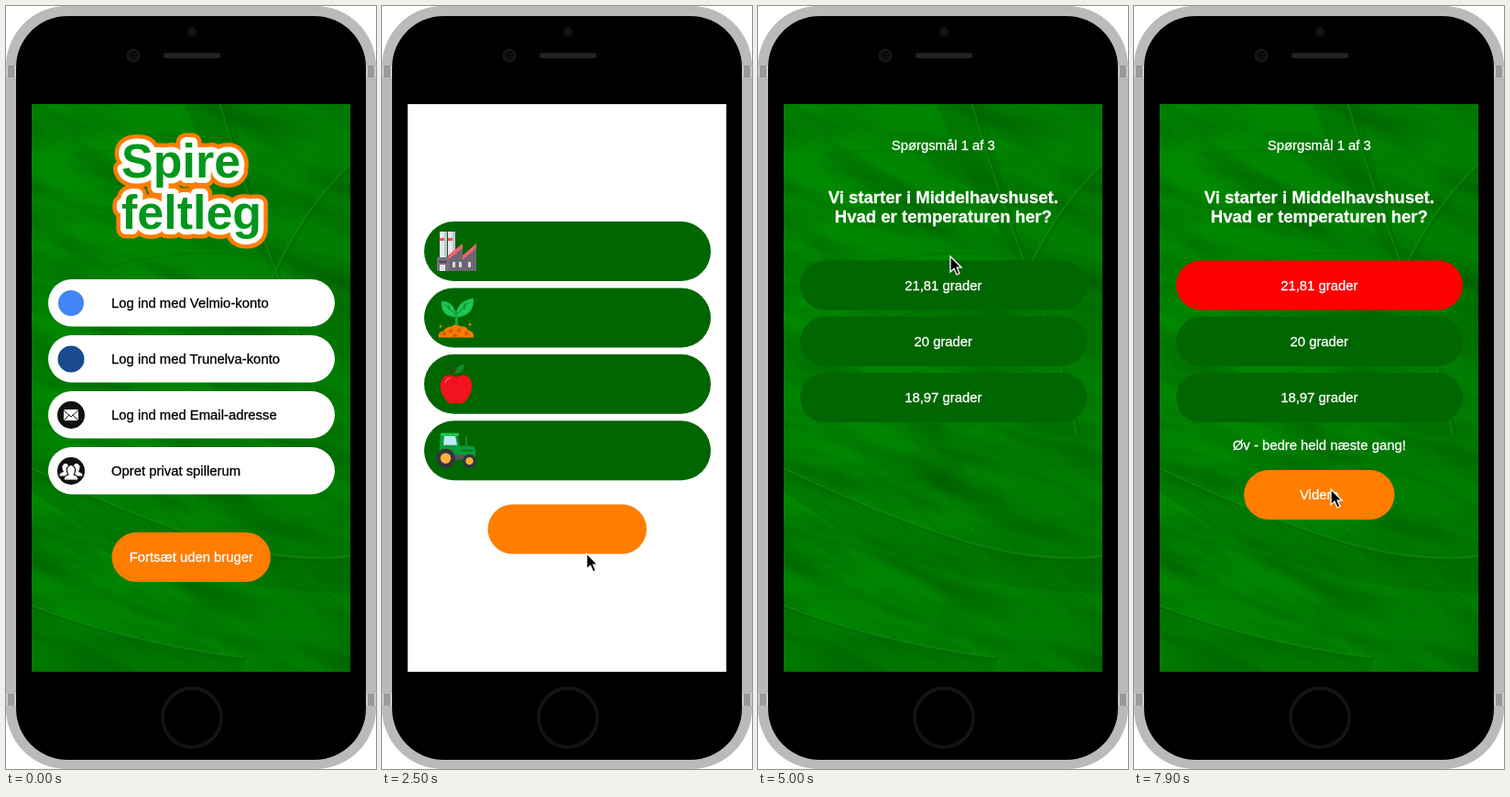
An HTML page for the animation above (8000 ms loop, 404 px wide and 832 px high).

```html
<!DOCTYPE html>
<html lang="da">
<head>
<meta charset="utf-8">
<style>
html, body { margin: 0; width: 100%; height: 100%; overflow: hidden; background: #fff; }
svg { display: block; width: 404px; height: 832px; }
text { font: 14.85px "Liberation Sans", Arial, sans-serif; fill: #fff; stroke: #fff; stroke-width: .3px; }
.dark { fill: #000; stroke: #000; }
.mid { text-anchor: middle; }
.title { font-size: 22.28px; font-weight: bold; }
.question { font-size: 18.56px; font-weight: bold; }
.brand { font-size: 52px; font-weight: bold; stroke-linejoin: round; }
</style>
</head>
<body>
<svg id="stage" viewBox="0 0 404 832"></svg>
<script>
const GREEN = '#006600', ORANGE = '#ff7d00';

const rect = (x, y, w, h, fill, r = 0) => `<rect x="${x}" y="${y}" width="${w}" height="${h}" rx="${r}" fill="${fill}"/>`;
const pill = (x, y, w, h, fill) => rect(x, y, w, h, fill, h / 2);
const circle = (x, y, r, fill) => `<circle cx="${x}" cy="${y}" r="${r}" fill="${fill}"/>`;
const path = (d, fill, stroke = 'none', width = 1) =>
  `<path d="${d}" fill="${fill}" stroke="${stroke}" stroke-width="${width}" stroke-linecap="round"/>`;
const line = (d, stroke, width) => path(d, 'none', stroke, width);
const text = (x, y, s, cls = 'mid', attrs = '') => `<text x="${x}" y="${y}" class="${cls}" ${attrs}>${s}</text>`;
const group = (id, body, attrs = '') => `<g id="${id}" ${attrs}>${body}</g>`;
const at = (x, y, body) => `<g transform="translate(${x} ${y})">${body}</g>`;
const faded = (opacity, body) => `<g opacity="${opacity}">${body}</g>`;

function phone() {
  let s = rect(0, 0, 404, 832, '#bababa', 66) + rect(11, 11, 382, 811, '#000', 56);
  for (const y of [65, 750]) for (const x of [0, 393])
    s += rect(x, y, 11, 13, '#cbcbcb') + rect(x + 2, y, 7, 13, '#999');
  return s + circle(203, 28, 5, '#131313') + circle(139, 54, 7.5, '#181818') + circle(139, 54, 5, '#0c0c0c') +
    rect(172, 51, 62, 6, '#222', 3) +
    '<circle cx="203" cy="776" r="32" fill="none" stroke="#131313" stroke-width="4"/>';
}

function leaf() {
  const mainVeins = 'M235 107Q262 200 300 300T350 470M377 175Q325 225 292 300M28 505Q120 550 210 580T377 602M28 655Q130 695 260 712';
  let veins = '';
  for (let i = 0; i < 6; i++) veins += `M${225 + i * 22} ${170 + i * 52}q-60 ${-20 + i * 4} -150 ${-8 + i * 8}`;
  for (let i = 0; i < 7; i++) veins += `M${45 + i * 45} ${512 + i * 13}q28 45 90 70`;
  return rect(28, 107, 348, 619, 'url(#leafShade)') +
    faded(.3, path('M195 107H246Q268 200 300 300Q230 200 195 107ZM28 505Q120 550 210 580T377 602V640Q180 640 28 530ZM28 655Q130 695 260 712V726H28Z', '#005c00')) +
    '<g transform="rotate(20 202 416)"><rect x="-160" y="20" width="730" height="800" filter="url(#mottle)"/></g>' +
    faded(.35, line(veins, '#006400', 2)) +
    faded(.5, line(mainVeins, '#006600', 4)) + faded(.5, at(-2, -2, line(mainVeins, '#149414', 2)));
}

function brand() {
  const words = style => text(126, 187, 'Spire', 'brand', `style="${style}"`) + text(126, 243, 'feltleg', 'brand', `style="${style}"`);
  const outline = (color, width) => words(`fill:${color};stroke:${color};stroke-width:${width}px`);
  return outline(ORANGE, 21) + outline('#fff', 12) + words('fill:#00961c;stroke:none');
}

const envelope = circle(0, 0, 15, '#111') + rect(-8, -6, 16, 12, '#fff', 1) +
  line('M-8 -5L0 2L8 -5M-8 6L-2 0M8 6L2 0', '#111', 1);
const person = (x, y, k) => `<g transform="translate(${x} ${y}) scale(${k})">` +
  path('M-8 9Q-8 4 -3 3Q-5 0 -4.5 -4Q0 -11 4.5 -4Q5 0 3 3Q8 4 8 9Z', '#fff', '#111', 1.2) + '</g>';
const people = circle(0, 0, 15, '#111') + person(-6, -2, .9) + person(6, -2, .9) + person(0, 1, 1);

// Icons occupy a 42 by 44 box
const factory = rect(3, 0, 8, 32, '#e6e6ec') + rect(12, 0, 8, 32, '#e6e6ec') +
  rect(3, 7, 8, 3, '#f05060') + rect(12, 7, 8, 3, '#f05060') + rect(8, 0, 3, 30, '#c4c4ce') + rect(17, 0, 3, 30, '#c4c4ce') +
  path('M12 43V30L28 15V30L43 15V43Z', '#6d6673') + path('M12 31V26L28 13V18ZM28 31V26L43 13V18Z', '#f0606c') +
  rect(0, 28, 13, 15, '#77707d') + rect(2, 32, 9, 2, '#4c4652') + rect(3, 36, 6, 7, '#e0e0e8') +
  [17, 24, 34].map(x => rect(x, 33, 3, 6, '#d9d9e2')).join('');

const sprout = line('M21 31Q22 22 21 15', '#18a43c', 3) +
  path('M21 21Q3 20 5 3Q20 4 21 21Z', '#1cc853', '#0b8a30', .6) + path('M21 21Q20 3 40 0Q41 20 21 21Z', '#1cc853', '#0b8a30', .6) +
  line('M9 7L19 17M34 5L23 17M13 8V12M30 6V12', '#087a28', 1) +
  path('M2 43Q0 37 7 36Q10 31 16 31Q20 27 26 31Q31 30 34 35Q41 36 40 43Z', '#f57c00') +
  [[8, 39], [15, 36], [24, 35], [32, 39], [20, 41]].map(([x, y]) => circle(x, y, 2.2, '#d45c00')).join('') +
  circle(4, 31, 1.3, '#f57c00') + circle(36, 29, 1.3, '#f57c00');

const apple = path('M21 14Q10 8 5 17Q1 27 9 38Q14 45 21 42Q28 45 33 38Q41 27 37 17Q32 8 21 14Z', '#f3121f') +
  line('M21 14Q20 6 16 3', '#6b3a16', 2) + path('M20 10Q21 0 30 0Q30 9 20 10Z', '#118c30') +
  line('M9 20Q10 16 14 15', '#ff6068', 1.5);

const wheel = (x, y, r) => circle(x, y, r, '#34343c') + circle(x, y, r * .55, '#ffb03a');
const tractor = at(0, 2.5, path('M4 0H22L25 14H39Q43 16 42 26H2Z', '#0c9c34') + path('M8 3H20L22 13H7Z', '#bdeafa') +
  rect(4, 0, 20, 3, '#19c650') + rect(31, 4, 2, 12, '#178c3c') + rect(27, 18, 12, 2, '#087526') +
  rect(18, 24, 20, 5, '#55555f') + wheel(9.5, 27.5, 10.5) + wheel(35.5, 30.5, 7.5));

function loginPage() {
  const rows = ['Log ind med Velmio-konto', 'Log ind med Trunelva-konto', 'Log ind med Email-adresse', 'Opret privat spillerum'];
  const icons = [circle(0, 0, 14, '#4285f4'), circle(0, 0, 14.5, '#194b8e'), envelope, people];
  return brand() + rows.map((s, i) => {
    const y = 298 + i * 61;
    return pill(46, y, 313, 51.5, '#fff') + at(71, y + 26, icons[i]) + text(115, y + 31, s, 'dark');
  }).join('') + pill(115.5, 574, 173.5, 54, ORANGE) + text(202.3, 606, 'Fortsæt uden bruger');
}

function scenarioPage() {
  const buttons = [factory, sprout, apple, tractor].map((icon, i) =>
    pill(46, 235 + i * 72.4, 313, 65, GREEN) + at(60, 246 + i * 72.4, icon)).join('') + pill(115.5, 543.5, 173.5, 54, ORANGE);
  const labels = [[272, 'Forurening vs. natur'], [336, 'Beskyttelse af'], [353, 'områder og befolkning'],
    [417, 'Mad til hele verden'], [489, 'Landbrug vs. natur']];
  return buttons + group('labels', text(202.3, 183, 'Vælg scenarie', 'mid title') +
    labels.map(([y, s]) => text(224, y, s)).join('') + text(202.3, 575, 'Vælg for mig'));
}

function questionPage() {
  const answers = ['21,81 grader', '20 grader', '18,97 grader'];
  return text(202.3, 157, 'Spørgsmål 1 af 3') +
    text(202.3, 215, 'Vi starter i Middelhavshuset.', 'mid question') +
    text(202.3, 236, 'Hvad er temperaturen her?', 'mid question') +
    answers.map((s, i) => group('answer' + i,
      pill(46, 277.5 + i * 61.3, 313, 54, GREEN) + text(202.3, 309.5 + i * 61.3, s))).join('') +
    group('feedback', text(202.3, 484, 'Øv - bedre held næste gang!') +
      pill(120, 506, 164.5, 54, ORANGE) + text(202.3, 538, 'Videre'));
}

const $ = id => document.getElementById(id);
$('stage').innerHTML = `<defs>
  <linearGradient id="leafShade" x2="1" y2=".25"><stop stop-color="#008a00"/><stop offset=".5" stop-color="#008400"/><stop offset="1" stop-color="#007c00"/></linearGradient>
  <filter id="mottle" x="0" y="0" width="1" height="1" color-interpolation-filters="sRGB">
    <feTurbulence type="fractalNoise" baseFrequency=".007 .03" numOctaves="4" seed="4"/>
    <feColorMatrix values="0 0 0 0 0  0 0 0 0 .36  0 0 0 0 0  1.6 0 0 0 -.6"/>
  </filter>
  <clipPath id="screen"><rect x="28" y="107" width="348" height="619"/></clipPath></defs>` +
  phone() + group('app', rect(28, 107, 348, 619, '#fff') + group('leaf', leaf()) +
    group('login', loginPage()) + group('scenario', scenarioPage()) + group('quiz', questionPage()) +
    group('cursor', path('M0 0V17L4 13.3L7 20L10 18.7L7.2 12.2H12.2Z', '#000', '#fff', 1.3)),
  'clip-path="url(#screen)"');

// Cursor stops: time, x, y
const stops = [[900, 376, 727], [1700, 225, 597], [2100, 225, 597], [2300, 223.5, 597], [3500, 223.5, 597],
  [4200, 210, 273], [5600, 210, 273], [6200, 209, 297], [6700, 209, 297], [7600, 215, 527]];

function cursorAt(t) {
  const i = stops.findIndex(s => s[0] > t);
  if (i === 0) return stops[0].slice(1);
  if (i < 0) return stops.at(-1).slice(1);
  const [t0, x0, y0] = stops[i - 1], [t1, x1, y1] = stops[i];
  const u = (t - t0) / (t1 - t0), k = u * u * (3 - 2 * u);
  return [x0 + (x1 - x0) * k, y0 + (y1 - y0) * k];
}

const show = (id, on) => $(id).setAttribute('display', on ? 'inline' : 'none');

function draw(now) {
  const t = Math.floor(now % 8000 / 100) * 100;
  const loading = t >= 2400 && t < 2700;
  show('leaf', !loading);
  show('login', t < 2400);
  show('scenario', t >= 2400 && t < 4500);
  show('labels', !loading);
  show('quiz', t >= 4500);
  show('feedback', t >= 6400);
  show('cursor', t > 900);
  $('answer0').firstChild.setAttribute('fill', t >= 6400 ? '#ff0000' : GREEN);
  $('cursor').setAttribute('transform', `translate(${cursorAt(t)})`);
  requestAnimationFrame(draw);
}
requestAnimationFrame(draw);
</script>
</body>
</html>
```
